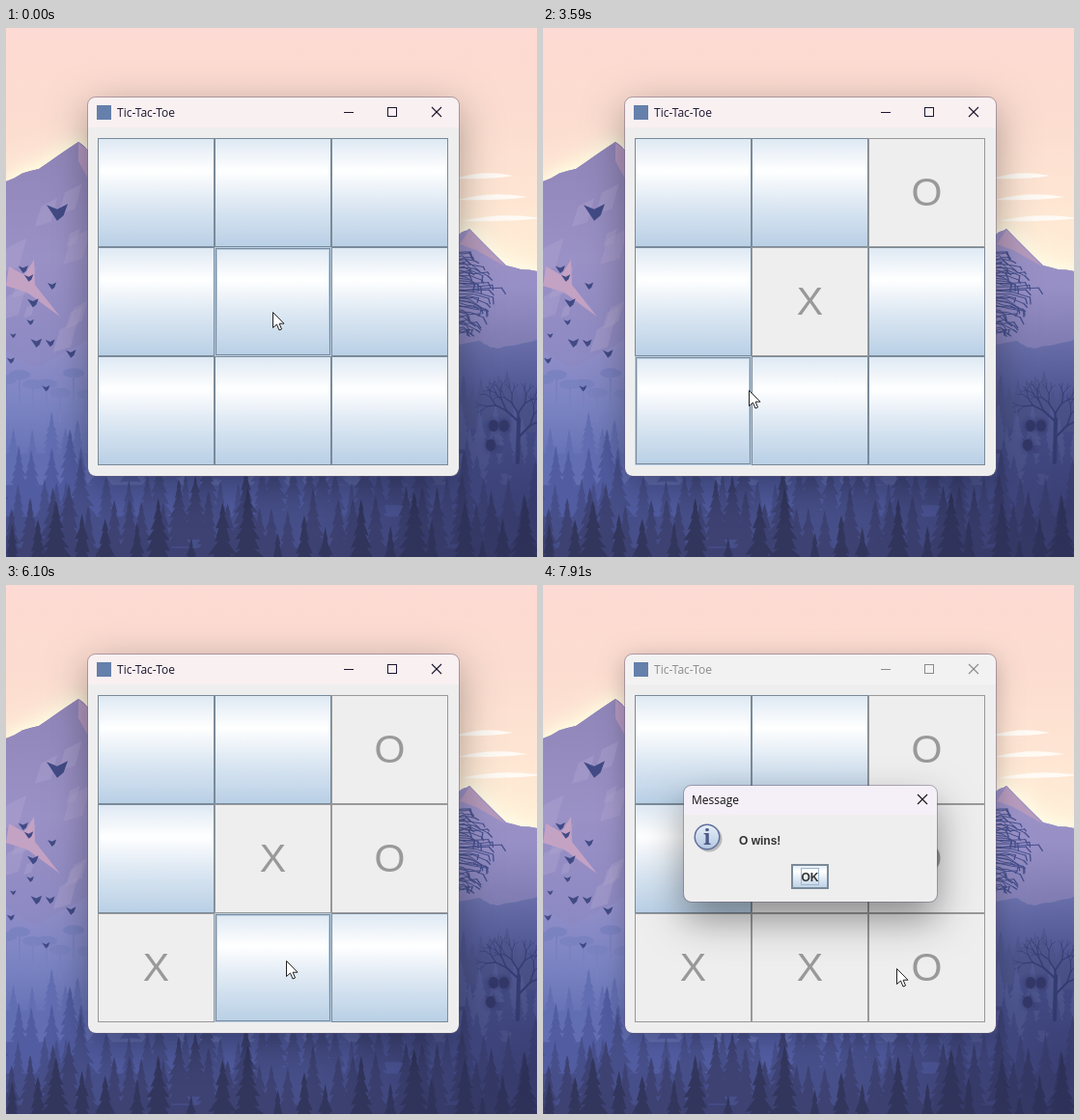
Write an HTML page with a canvas that moves like this. It is 550 px wide and 548 px high and loops after 8 s.

```html
<!DOCTYPE html>
<html lang="en">
<head>
<meta charset="utf-8">
<title>Tic-Tac-Toe</title>
<style>
  html, body { margin: 0; width: 100%; height: 100%; overflow: hidden; }
  canvas { display: block; }
</style>
</head>
<body>
<canvas id="stage" width="550" height="548"></canvas>
<script>
const W = 550, H = 548, LOOP = 8000, TICK = 68;
const GRID = { x: 95, y: 114, w: 121, h: 113 };
const BLUE = '#b8cfe5', EDGE = '#7a8a99', GRAY = '#999';
const UI = '12px "Open Sans", "Noto Sans", sans-serif';
const BOLD = 'bold 12px "Liberation Sans", Arial, sans-serif';
const MARK = '41px "Liberation Sans", Arial, sans-serif';
const DIALOG_START = 7650, DIALOG_END = 7910;

// Each stop of the pointer: when it travels, where it ends, when it clicks there.
const STOPS = [
  { from: -TICK, to: 0, x: 276, y: 294, down: 710, up: 780 },
  { from: 1240, to: 1710, x: 395, y: 185, down: 2300, up: 2370 },
  { from: 2830, to: 3590, x: 213, y: 375 },
  { from: 3660, to: 3800, x: 199, y: 383, down: 3870, up: 3940 },
  { from: 4270, to: 4620, x: 405, y: 301, down: 5210, up: 5280 },
  { from: 5680, to: 6100, x: 290, y: 389, down: 6500, up: 6630 },
  { from: 6960, to: 7240, x: 366, y: 397, down: 7440, up: 7510 }
];
const CLICKS = STOPS.filter(stop => stop.down);

let g = document.getElementById('stage').getContext('2d');

let seed = 11;
function rand(a = 0, b = 1) {
  seed = (seed * 16807) % 2147483647;
  return a + (b - a) * seed / 2147483647;
}

function fade(y0, y1, ...colors) {
  const fill = g.createLinearGradient(0, y0, 0, y1);
  colors.forEach((color, i) => fill.addColorStop(i / (colors.length - 1), color));
  return fill;
}

function rect(x, y, w, h, color) {
  g.fillStyle = color;
  g.fillRect(x, y, w, h);
}

function frame(x, y, w, h, color) {
  g.lineWidth = 1;
  g.strokeStyle = color;
  g.strokeRect(x + .5, y + .5, w - 1, h - 1);
}

function trace(points) {
  g.beginPath();
  points.forEach(([x, y]) => g.lineTo(x, y));
}

function shape(points, color) {
  trace(points);
  g.closePath();
  g.fillStyle = color;
  g.fill();
}

function line(points, color, width = 1) {
  trace(points);
  g.strokeStyle = color;
  g.lineWidth = width;
  g.stroke();
}

function oval(x, y, rx, ry, color) {
  g.beginPath();
  g.ellipse(x, y, rx, ry, 0, 0, 7);
  g.fillStyle = color;
  g.fill();
}

function text(string, x, y, font, color, align = 'left') {
  g.font = font;
  g.fillStyle = color;
  g.textAlign = align;
  g.fillText(string, x, y);
}

function withShadow(color, blur, offset, draw) {
  g.save();
  g.shadowColor = color;
  g.shadowBlur = blur;
  g.shadowOffsetY = offset;
  draw();
  g.restore();
}

// ---- wallpaper ----

// Roughens the outline between key points by displacing midpoints.
function rough(points, amount) {
  if (amount < .6) return points;
  const finer = points.slice(0, 1);
  for (let i = 1; i < points.length; i++) {
    const [ax, ay] = points[i - 1], [bx, by] = points[i];
    finer.push([(ax + bx) / 2, (ay + by) / 2 + rand(-amount, amount)], points[i]);
  }
  return rough(finer, amount / 2);
}

function ridge(points, amount, color, glow) {
  const top = rough(points, amount);
  const outline = [...top, [top.at(-1)[0], 470], [top[0][0], 470]];
  if (glow) for (const blur of [30, 12]) withShadow(glow, blur, -3, () => shape(outline, color));
  shape(outline, color);
}

function pine(x, top, height, color) {
  const half = height * .23, tiers = 7, left = [], right = [];
  for (let i = 1; i <= tiers; i++) {
    const y = top + height * i / tiers, w = half * i / tiers * rand(.8, 1.2);
    right.push([x + w, y], [x + w * .55, y - 1]);
    left.unshift([x - w * .55, y - 1], [x - w, y]);
  }
  shape([[x, top], ...right, ...left], color);
}

function forest(layer) {
  const y = 400 + layer * 25, height = 48 + layer * 9;
  const color = `hsl(${231 + layer}, ${34 - layer}%, ${54 - layer * 6.5}%)`;
  for (let x = -10; x < W + 10; x += height * rand(.15, .45))
    pine(x, y + rand(-.3, .35) * height, height * rand(.8, 1.3), color);
  rect(0, y + height * .85, W, H, color);
}

function bird(x, y, s) {
  shape([[x - s, y - s * .7], [x, y - s * .3], [x + s, y - s * .8], [x + s * .6, y + s * .3], [x, y + s * .8]], '#414a85');
}

function branch(x, y, angle, length, width) {
  const nx = x + Math.cos(angle) * length, ny = y + Math.sin(angle) * length;
  line([[x, y], [nx, ny]], '#3b4480', width);
  if (length < 6) return;
  for (const side of [-1, 1]) branch(nx, ny, angle + side * rand(.25, .65), length * .74, width * .7);
}

function cloud(x, y, w, h) {
  g.beginPath();
  g.moveTo(x, y);
  g.quadraticCurveTo(x + w * .5, y - h * 1.6, x + w, y - h * .5);
  g.quadraticCurveTo(x + w * .6, y + h * .2, x, y);
  g.fillStyle = '#fffaf4';
  g.fill();
}

function paintWallpaper() {
  rect(0, 0, W, H, fade(0, 260, '#fddad3', '#fcdcd0', '#fee5d3', '#fff0d6'));
  for (let i = 0; i < 3; i++) cloud(465 + i * 3, 156 + i * 22, 60 + i * 12, 6);

  const purple = fade(118, 360, '#9085b8', '#9a91c6', '#8b88c2');
  ridge([[0, 159], [34, 146], [75, 118], [84, 126], [300, 300]], 2, purple, '#fffbe0');
  ridge([[300, 300], [469, 214], [480, 208], [518, 246], [550, 252]], 2, purple, '#fffbe6');
  for (let i = 0; i < 12; i++) {
    const x = rand(0, 70), y = rand(170, 320), s = rand(8, 22);
    shape([[x, y], [x + s, y - s * .5], [x + s * .6, y + s], [x - s * .4, y + s * 1.3]], 'rgba(176,164,208,.4)');
  }
  shape([[75, 119], [85, 127], [85, 156], [75, 138]], '#b397c0');
  shape([[480, 209], [517, 247], [487, 230], [470, 224]], '#b79bbd');
  shape([[3, 247], [19, 256], [29, 240], [30, 266], [56, 299], [22, 274], [0, 267]], '#c4a2c4');

  ridge([[-5, 330], [32, 352], [85, 322], [300, 340]], 3, fade(330, 460, '#928fc9', '#7a83c2', '#606db2'));
  for (let x = 0; x < 95; x += 14) {
    const y = rand(355, 380);
    oval(x, y, 11, 5, '#7a82c0');
    rect(x - 1, y, 2, 30, '#7a82c0');
  }
  ridge([[300, 345], [490, 324], [510, 332], [550, 323]], 3, fade(325, 450, '#7379b7', '#5a64a8', '#4a5498'));
  for (let x = 465; x < W; x += 9) pine(x, rand(350, 375), 45, '#59639f');

  g.lineCap = 'round';
  for (let i = 0; i < 45; i++) {
    const y = 234 + i * 1.9, reach = 46 * rand(.3, 1) * (1 - Math.abs(i - 20) / 34);
    const tip = [469 + reach, y + rand(-4, 7)];
    line([[462, y + rand(-8, 4)], [469 + reach * .5, y - 2], tip], '#46508e');
    line([tip, [tip[0] + rand(-2, 5), tip[1] + rand(2, 7)]], '#46508e', 1.3);
  }

  [0, 1].forEach(forest);
  line([[530, 450], [531, 405]], '#3b4480', 4);
  for (let i = 0; i < 3; i++) branch(531, 408 + i * 8, -1.6 + (i - 1) * .8, 17, 2.2);
  for (const [x, y] of [[505, 412], [516, 412], [502, 432]])
    withShadow('#30366b', 6, 0, () => oval(x, y, 5, 6, '#363d72'));
  [2, 3, 4].forEach(forest);

  const dusk = g.createRadialGradient(540, 500, 0, 540, 500, 230);
  dusk.addColorStop(0, 'rgba(42,44,84,.6)');
  dusk.addColorStop(1, 'rgba(42,44,84,0)');
  rect(0, 0, W, H, dusk);

  bird(53, 191, 11);
  for (let i = 0; i < 11; i++) bird(rand(3, 72), 250 + i * 14 * rand(.6, 1), rand(3, 6));
}

const wallpaper = document.createElement('canvas');
wallpaper.width = W;
wallpaper.height = H;
const screen = g;
g = wallpaper.getContext('2d');
paintWallpaper();
g = screen;

// ---- windows ----

function panel(x, y, w, h, barHeight, barColor, shadow) {
  const outline = inset => {
    g.beginPath();
    g.roundRect(x + inset, y + inset, w - 2 * inset, h - 2 * inset, 8);
  };
  withShadow(...shadow, () => { outline(1); g.fillStyle = '#eee'; g.fill(); });
  g.save();
  outline(1);
  g.clip();
  rect(x, y, w, barHeight, barColor);
  g.restore();
  outline(.5);
  g.strokeStyle = 'rgba(100,90,120,.45)';
  g.lineWidth = 1;
  g.stroke();
}

function closeIcon(x, y, color) {
  for (const d of [-5, 5]) line([[x - 5, y - d], [x + 5, y + d]], color, 1.1);
}

function mainWindow(active) {
  const ink = active ? '#1c1630' : '#8b8b8f';
  panel(84, 71, 386, 394, 32, active ? '#f9f0f1' : '#f3f2f2',
    active ? ['rgba(0,0,0,.34)', 42, 11] : ['rgba(0,0,0,.26)', 26, 5]);
  rect(94, 80, 15, 15, '#6580ab');
  text('Tic-Tac-Toe', 115, 92, UI, ink);
  line([[350, 87.5], [360, 87.5]], ink);
  frame(395, 82, 10, 10, ink);
  closeIcon(446, 87, ink);
}

function metal(x, y, w, h) {
  const fill = g.createLinearGradient(0, y, 0, y + h);
  ['#dde8f3', '#fff', '#dde8f3', BLUE].forEach((color, i) => fill.addColorStop(Math.min(1, i * .3 + (i > 2)), color));
  rect(x, y, w, h, fill);
}

function cell(index, mark, hovered, pressed) {
  const { w, h } = GRID;
  const x = GRID.x + index % 3 * w, y = GRID.y + Math.floor(index / 3) * h;
  if (mark) {
    rect(x, y, w, h, '#eee');
    frame(x, y, w, h, GRAY);
    text(mark, x + w / 2, y + 69.5, MARK, GRAY, 'center');
  } else if (pressed) {
    rect(x, y, w, h, BLUE);
    frame(x, y, w, h, EDGE);
    rect(x, y, w, 2, EDGE);
    rect(x, y, 2, h, EDGE);
  } else {
    metal(x, y, w, h);
    const borders = hovered ? [BLUE, EDGE, BLUE] : [EDGE];
    borders.forEach((color, i) => frame(x + i, y + i, w - 2 * i, h - 2 * i, color));
  }
}

function dialog(p) {
  g.save();
  g.globalAlpha = p;
  g.translate(277, 268);
  g.scale(.9 + .1 * p, .9 + .1 * p);
  g.translate(-277, -268);
  panel(145, 207, 264, 122, 31, '#f5eff7', ['rgba(0,0,0,.42)', 40, 18]);
  text('Message', 154, 227, UI, '#111');
  closeIcon(393, 222, '#111');

  oval(172, 263, 13.5, 13.5, '#bbb');
  oval(170, 261, 13.5, 13.5, '#5f6f9c');
  oval(170, 261, 12, 12, fade(249, 273, '#e6eef8', '#b4c8e2'));
  text('i', 170, 269, 'bold 22px "Noto Serif", serif', '#4d5a88', 'center');
  text('O wins!', 203, 269, BOLD, '#333');

  metal(257, 289, 39, 26);
  frame(257, 289, 39, 26, EDGE);
  frame(258, 290, 37, 24, EDGE);
  frame(267, 293, 19, 18, '#a3b8cc');
  text('OK', 276.5, 307, BOLD, '#333', 'center');
  g.restore();
}

function cursor(x, y) {
  const arrow = [[0, 0], [0, 16], [4, 12.5], [6.5, 18.5], [9, 17.5], [6.6, 11.7], [11.5, 11.7]]
    .map(([dx, dy]) => [x + .5 + dx, y + .5 + dy]);
  shape(arrow, '#fff');
  line([...arrow, arrow[0]], '#222');
}

// ---- timeline ----

function progress(t, from, to) {
  const steps = Math.round((to - from) / TICK) + 1;
  const step = Math.floor((t - from) / (to - from) * (steps - 1) + .001);
  return Math.min(1, (step + 1) / steps);
}

function pointerAt(t) {
  let x = 0, y = 0;
  for (const stop of STOPS) {
    if (t < stop.from) break;
    const p = progress(t, stop.from, stop.to), ease = p * p * (3 - 2 * p);
    x += (stop.x - x) * ease;
    y += (stop.y - y) * ease;
  }
  return { x: Math.round(x), y: Math.round(y) };
}

function cellAt({ x, y }) {
  return Math.floor((x - GRID.x) / GRID.w) + 3 * Math.floor((y - GRID.y) / GRID.h);
}

function render(t) {
  const pointer = pointerAt(t), hovered = cellAt(pointer);
  const pressed = CLICKS.some(({ down, up }) => t >= down && t < up);
  const marks = [];
  CLICKS.forEach((click, turn) => {
    // X opens; both sides alternate
    if (t >= click.up) marks[cellAt(click)] = 'XO'[turn % 2];
  });

  g.drawImage(wallpaper, 0, 0);
  mainWindow(t < DIALOG_START);
  for (let i = 0; i < 9; i++) cell(i, marks[i], i === hovered, pressed && i === hovered);
  if (t >= DIALOG_START) dialog(progress(t, DIALOG_START, DIALOG_END));
  if (pressed) oval(pointer.x, pointer.y, 12, 12, '#dae577');
  cursor(pointer.x, pointer.y);
}

function tick() {
  render(performance.now() % LOOP);
  requestAnimationFrame(tick);
}
tick();
</script>
</body>
</html>
```
